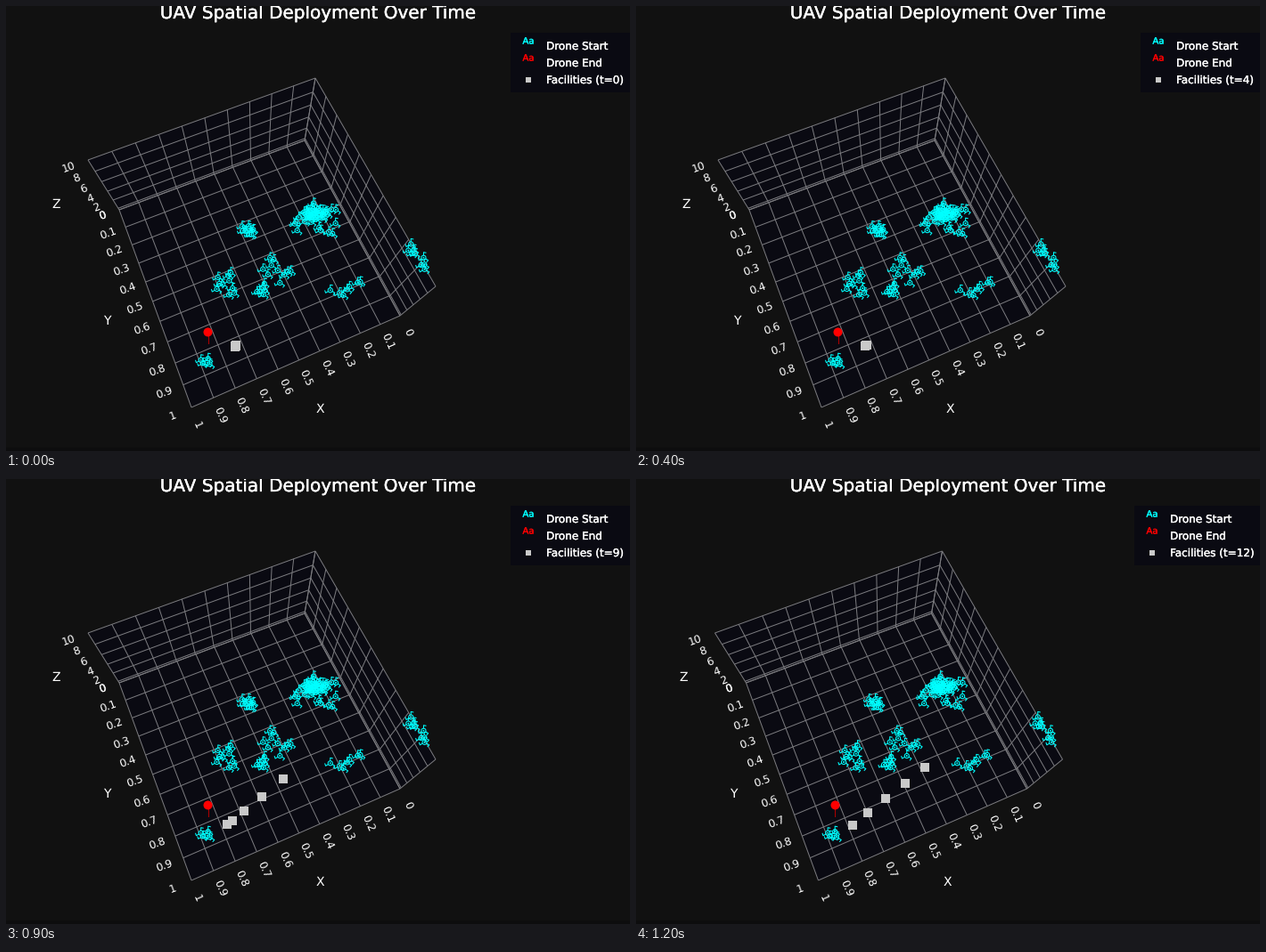
A matplotlib script that plays this animation: 700 px wide and 500 px high, repeating every 1.3 s.

```python
import numpy as np
import matplotlib.pyplot as plt
from matplotlib.animation import FuncAnimation
from matplotlib.collections import LineCollection
from matplotlib.patches import Polygon, Rectangle
from matplotlib.patheffects import withStroke
from matplotlib.transforms import Affine2D

W, H, DPI = 700, 500, 100
PT = 72 / DPI
FRAMES, INTERVAL = 13, 100
PAPER, PANEL, GRID = "#111111", "#0a0a12", "#7b7b7f"
CYAN, RED, SILVER = "#00ffff", "#ff0000", "#c9c9c9"

plt.rcParams["font.family"] = "DejaVu Sans"
plt.rcParams["text.hinting"] = "none"
fig = plt.figure(figsize=(W / DPI, H / DPI), dpi=DPI, facecolor=PAPER)
ax = fig.add_axes([0, 0, 1, 1])
ax.set(xlim=(0, W), ylim=(H, 0))
ax.axis("off")

scene_shift, legend_shift = Affine2D(), Affine2D()
SCENE = scene_shift + ax.transData
LEGEND = legend_shift + ax.transData


def plane(c00, c10, c11, c01):
    """Perspective map from the unit square to four screen corners."""
    rows, rhs = [], []
    for (u, v), (x, y) in zip([(0, 0), (1, 0), (1, 1), (0, 1)],
                              [c00, c10, c11, c01]):
        rows.append([u, v, 1, 0, 0, 0, -u * x, -v * x])
        rows.append([0, 0, 0, u, v, 1, -u * y, -v * y])
        rhs += [x, y]
    m = np.append(np.linalg.solve(rows, rhs), 1).reshape(3, 3)

    def project(u, v):
        x, y, w = m @ (u, v, 1)
        return np.array([x / w, y / w])
    return project


def label(x, y, s, size, **kw):
    kw = {"ha": "center", "va": "center", "color": "white",
          "transform": SCENE, **kw}
    return ax.text(x, y, s, fontsize=size * PT, **kw)


def caption(x, y, s, size, color="white", **kw):
    """Slightly heavier text set on a baseline."""
    return label(x, y, s, size, va="baseline", color=color,
                 path_effects=[withStroke(linewidth=0.35 * PT,
                                          foreground=color)], **kw)


def square(x, y, size, where):
    return ax.plot(x, y, "s", color=SILVER, ms=size * PT, mew=0,
                   transform=where)[0]


# Corners of the box: floor, back wall, side wall
near_l, near_r, far_r, far_l = (208, 451), (442, 348), (335, 151), (127, 229)
top_l, top_far, top_r = (92, 173), (347, 81), (482, 315)
floor = plane(far_r, far_l, near_l, near_r)
back = plane(far_r, far_l, top_l, top_far)
side = plane(far_r, near_r, top_r, top_far)

ticks = np.linspace(0, 1, 11)
Z_MIN = -0.4
z_ticks = np.arange(0, 11, 2)
heights = (z_ticks - Z_MIN) / (10 - Z_MIN)

segments = []
for face, levels in ((floor, ticks), (back, np.append(0, heights)),
                     (side, np.append(0, heights))):
    ax.add_patch(Polygon([face(0, 0), face(1, 0), face(1, 1), face(0, 1)],
                         fc=PANEL, lw=0, transform=SCENE))
    segments += [(face(t, 0), face(t, 1)) for t in ticks]
    segments += [(face(0, v), face(1, v)) for v in levels]
ax.add_collection(LineCollection(segments, colors=GRID, linewidths=PT,
                                 transform=SCENE), autolim=False)

for t in ticks:
    name = f"{t:.1f}" if 0 < t < 1 else f"{t:.0f}"
    x, y = floor(t, 1)
    label(x + 8 - 2 * t, y + 19.5 + t, name, 12, rotation=-66)
    x, y = floor(1, t)
    label(x - 18.5 - 2 * t, y + 7.5 + 2 * t, name, 12, rotation=20)
for z, h in zip(z_ticks, heights):
    x, y = back(1, h)
    label(x - 17.5 - 0.4 * z, y + 9, str(z), 12, rotation=20)
for name, x, y in (("X", 352.5, 453), ("Y", 113, 354), ("Z", 56.5, 223)):
    label(x, y, name, 14)

# Swarms: centre, radii, number of drones
swarms = [
    ((271, 251), (8, 7), 9),
    ((348, 233), (14, 7), 26),
    ((350, 240), (30, 20), 18),
    ((248, 311), (13, 17), 10),
    ((301, 299), (21, 17), 11),
    ((288, 320), (7, 5), 5),
    ((378, 319), (15, 7), 5),
    ((396, 310), (3, 1), 2),
    ((456, 273), (5, 9), 5),
    ((468, 289), (4, 8), 4),
    ((224, 400), (6, 7), 5),
]
rng = np.random.default_rng(11)


def scatter(centre, radii, n):
    r = np.sqrt((np.arange(n) + 0.5) / n)
    a = 2.4 * np.arange(n) + rng.uniform(-0.7, 0.7, n)
    return centre + np.column_stack([r * np.cos(a), r * np.sin(a)]) * radii


drones = np.vstack([scatter(*s) for s in swarms])


def ring(r, n=14):
    a = np.linspace(0, 2 * np.pi, n)
    return np.column_stack([r * np.cos(a), r * np.sin(a)])


def rotor_arm(angle):
    c, s = np.cos(angle), np.sin(angle)
    arm = np.array([(0, -2.4), (0, -6), (3, -5.4)])
    return arm @ np.array([(c, s), (-s, c)])


glyph = [ring(2.6), ring(0.5, 7)]
glyph += [rotor_arm(k * 2 * np.pi / 3) for k in range(3)]
ax.add_collection(LineCollection([g + d for d in drones for g in glyph],
                                 colors=CYAN, linewidths=1.05 * PT,
                                 transform=SCENE), autolim=False)

# End pin
ax.plot([226.5, 226.5], [368, 379], color="#b00000", lw=PT, transform=SCENE)
ax.plot(226.2, 366, "o", color=RED, ms=10 * PT, mew=0, transform=SCENE)

facilities = square([], [], 9.8, SCENE)

# Title and legend
caption(350, 14, "UAV Spatial Deployment Over Time", 20,
        transform=ax.transData)
ax.add_patch(Rectangle((0, 495.5), W, 5, fc="#0d0d0e", lw=0))
ax.add_patch(Rectangle((566, 29.5), 160, 67.5, fc=PANEL, lw=0,
                       transform=LEGEND))
for y, color, name in ((49, CYAN, "Drone Start"), (68, RED, "Drone End")):
    caption(586, y - 6.5, "Aa", 10, color, transform=LEGEND)
    caption(606, y, name, 12, ha="left", transform=LEGEND)
square(586, 82.5, 5.6, LEGEND)
counter = caption(606, 87, "", 12, ha="left", transform=LEGEND)

# The chain of facilities: its two ends over time
key_times = [0, 7, 8, 9, 10, 12]
first = [(256.5, 382.5), (257, 382.3), (260, 379.7),
         (248.2, 388.2), (248.2, 388.2), (246, 388.7)]
last = [(258.2, 381.3), (259.5, 380.5), (265, 375.7),
        (311.2, 337.2), (320.5, 326.2), (327.5, 324.2)]


def at(t, keys):
    return np.array([np.interp(t, key_times, c) for c in zip(*keys)])


def positions(t):
    """Five points from end to end, crowded near the first at the split."""
    bend = 1.12 + 0.6 * np.exp(-3 * max(t - 9, 0))
    k = np.linspace(0, 1, 5)[:, None] ** bend
    return at(t, first) * (1 - k) + at(t, last) * k


def draw(t):
    wide = t >= 10
    scene_shift.clear().translate(-3.5 * wide, 0)
    legend_shift.clear().translate(-7 * wide, 0)
    facilities.set_data(*positions(t).T)
    counter.set_text(f"Facilities (t={t})")
    return facilities, counter


anim = FuncAnimation(fig, draw, frames=FRAMES, interval=INTERVAL,
                     repeat=True, repeat_delay=0, blit=False)
plt.show()
```
